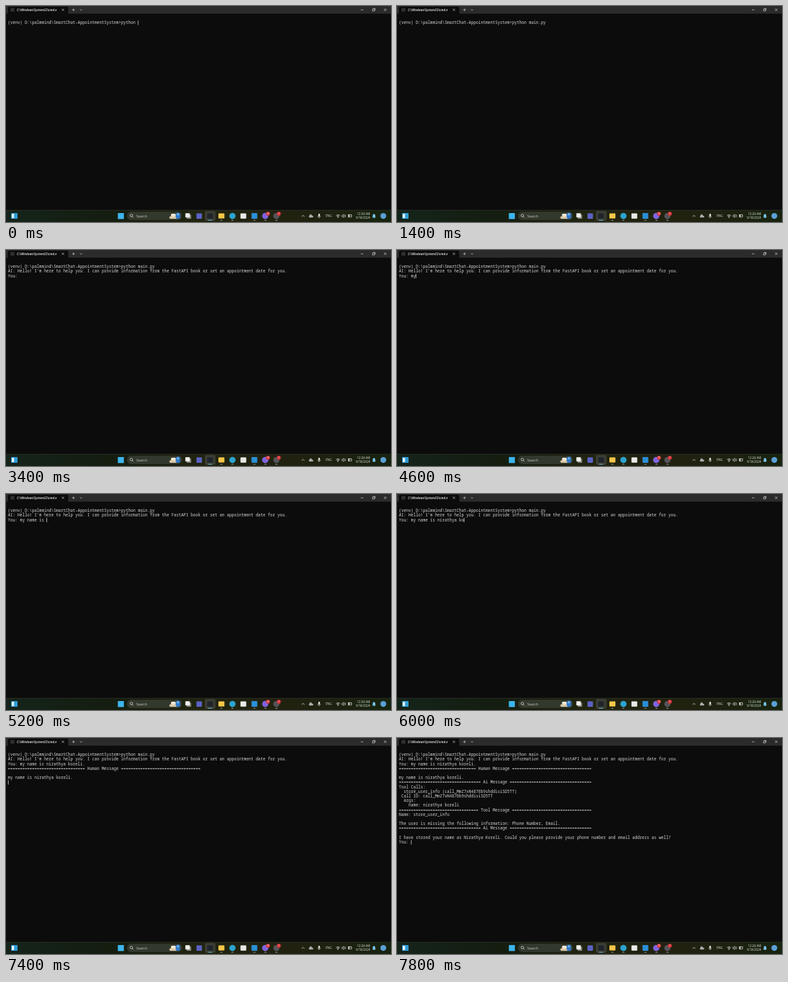
An HTML page with a canvas that plays this animation: 600 px wide and 338 px high, repeating every 8 s.

```html
<!DOCTYPE html>
<html lang="en">
<head>
<meta charset="utf-8">
<title>Terminal chat session</title>
<style>
html, body { margin: 0; width: 100%; height: 100%; overflow: hidden; background: #0c0c0c; }
canvas { display: block; width: 100vw; height: 100vh; }
</style>
</head>
<body>
<canvas id="stage"></canvas>
<script>
const W = 600, H = 338, LOOP = 8000, STEP = 200;
const COL = 3.75, ROW = 7.21, LEFT = 3, BASE = 28.1;
const MONO = '"Noto Sans Mono", monospace';
const UI = '"Open Sans", sans-serif';

const canvas = document.getElementById('stage');
const ctx = canvas.getContext('2d');
const dpr = window.devicePixelRatio || 1;
canvas.width = W * dpr;
canvas.height = H * dpr;

// Laid out large and scaled down, so glyph advances stay fractional.
function text(str, x, y, size, family, color, style = '', align = 'left') {
  const k = 8;
  ctx.save();
  ctx.translate(x, y);
  ctx.scale(1 / k, 1 / k);
  ctx.font = `${style} ${size * k}px ${family}`;
  ctx.textAlign = align;
  ctx.fillStyle = color;
  ctx.fillText(str, 0, 0);
  ctx.restore();
}

function rect(x, y, w, h, color, r = 0) {
  ctx.fillStyle = color;
  ctx.beginPath();
  ctx.roundRect(x, y, w, h, r);
  ctx.fill();
}

function disc(x, y, r, color) {
  ctx.fillStyle = color;
  ctx.beginPath();
  ctx.arc(x, y, r, 0, 7);
  ctx.fill();
}

function line(color, width, ...pts) {
  ctx.strokeStyle = color;
  ctx.lineWidth = width;
  ctx.beginPath();
  for (let i = 0; i < pts.length; i += 2) ctx.lineTo(pts[i], pts[i + 1]);
  ctx.stroke();
}

function arc(x, y, r, from, to, color, width) {
  ctx.strokeStyle = color;
  ctx.lineWidth = width;
  ctx.beginPath();
  ctx.arc(x, y, r, from, to);
  ctx.stroke();
}

function header(name) {
  const title = ` ${name} Message `;
  const left = Math.floor((80 - title.length) / 2);
  return '='.repeat(left) + title + '='.repeat(80 - title.length - left);
}

const PROMPT = '(venv) D:\\palmmind\\SmartChat-AppointmentSystem>python ';
const COMMAND = 'main.py';
const GREETING = "AI: Hello! I'm here to help you. I can provide information from the FastAPI book or set an appointment date for you.";
const INTRO = 'my name is nirathya koreli.';
const CALL = 'call_MmZ7xN4876b9shddisiSD5TT';
const HUMAN = [header('Human'), '', INTRO];
const TOOL = [
  header('Ai'),
  'Tool Calls:',
  `  store_user_info (${CALL})`,
  ` Call ID: ${CALL}`,
  '  Args:',
  '    name: nirathya koreli',
  header('Tool'),
  'Name: store_user_info',
  '',
  'The user is missing the following information: Phone Number, Email.'
];
const REPLY = [
  header('Ai'),
  '',
  'I have stored your name as Nirathya Koreli. Could you please provide your phone number and email address as well?'
];

const typed = (str, n) => str.slice(0, Math.max(0, Math.round(n)));

// The last row returned is the one that holds the cursor.
function screenRows(t) {
  const rows = [PROMPT + typed(COMMAND, 7 * t / 1000)];
  if (t < 1200) return rows;
  if (t < 3200) return [...rows, ''];
  rows.push(GREETING, 'You: ' + typed(INTRO, 2 + (t - 4600) / 70));
  if (t < 6600) return rows;
  rows.push(...HUMAN);
  if (t >= 7600) rows.push(...TOOL);
  if (t >= 7800) rows.push(...REPLY, 'You: ');
  else rows.push('');
  return rows;
}

function cursorOn(t) {
  const typing = t < 1200 || (t >= 4600 && t < 6600);
  const phase = t < 3200 ? 0 : 300;
  return typing || (t - phase) % 530 < 265;
}

function terminal(t) {
  rect(0, 12, W, 308, '#0c0c0c');
  const rows = screenRows(t);
  rows.forEach((row, i) => text(row, LEFT, BASE + i * ROW, 6.25, MONO, '#d6d6d6'));
  if (cursorOn(t)) {
    const last = rows.length - 1;
    rect(LEFT + rows[last].length * COL, 22.8 + last * ROW, 0.85, 7, '#d0d0d0');
  }
}

function titleBar() {
  rect(0, 0, W, 12, '#2b2b2b');
  rect(3, 1, 94, 11, '#0c0c0c', [2.5, 2.5, 0, 0]);
  rect(7, 3.2, 6, 5.6, '#303030');
  text('C:\\Windows\\System32\\cmd.e', 17, 7.8, 4.7, UI, '#f2f2f2', 'italic 600');
  const c = '#d8d8d8';
  line(c, 0.7, 87, 4.3, 90.4, 7.7);
  line(c, 0.7, 90.4, 4.3, 87, 7.7);
  line(c, 0.7, 103.2, 6, 107.2, 6);
  line(c, 0.7, 105.2, 4, 105.2, 8);
  line(c, 0.7, 115.4, 5.3, 117, 6.8, 118.6, 5.3);
  line(c, 0.7, 553, 6, 557, 6);
  ctx.strokeStyle = c;
  ctx.lineWidth = 0.7;
  ctx.strokeRect(571.2, 4.8, 3, 3);
  line(c, 0.7, 572.3, 3.8, 575.2, 3.8, 575.2, 6.8);
  line(c, 0.7, 589.2, 4.1, 592.8, 7.7);
  line(c, 0.7, 592.8, 4.1, 589.2, 7.7);
}

function searchBox() {
  rect(188.5, 322, 86, 13, '#33382d', 6.5);
  arc(195.4, 327.9, 2, 0, 7, '#e0e0e0', 0.8);
  line('#e0e0e0', 0.8, 196.9, 329.4, 198.7, 331.2);
  text('Search', 203, 330.5, 5.4, UI, '#c9ccc5');
  // Small illustration at the end of the box
  rect(254.5, 329, 13, 4, '#d9c9a4', 2);
  rect(257, 325, 8, 4.5, '#eee6d4', 2);
  rect(264.5, 323.5, 7, 9.5, '#2f78c8', 3);
  disc(268, 326, 1.7, '#79b9ea');
}

function badge(x, label) {
  disc(x, 325, 3.1, '#d8363a');
  text(label, x, 326.4, 3.9, UI, '#fff', '', 'center');
}

function apps() {
  rect(8, 324, 10, 9, '#2d9bd4', 1);
  rect(9, 325.2, 3.6, 6.6, '#e6f4fb', 0.5);

  rect(174.3, 324, 9.4, 9.4, '#3db5ee');
  searchBox();

  rect(281.5, 326.5, 7, 6.5, '#85877f', 0.6);
  rect(279.5, 324.3, 7, 6.5, '#efefef', 0.6);

  rect(310, 320.8, 16.5, 15.2, '#3a3e34', 2);
  rect(296.8, 324.5, 8.6, 8.4, '#5c62c4', 1);
  rect(313.6, 324.4, 9, 8.2, '#20242a', 1);
  rect(331, 324.6, 9.4, 8, '#f5c64a', 1);
  disc(352.9, 328.6, 4.9, '#2ba3cf');
  rect(365.4, 324.4, 9, 8.4, '#e9e9e7', 1);
  rect(382.6, 324, 9, 9, '#2a8fd6', 1);
  disc(404, 328.6, 4.9, '#7f63df');
  disc(421.4, 328.7, 4.8, '#55545a');
  badge(408.2, '12');
  badge(425.2, '1');

  rect(314.5, 334.8, 7, 1, '#75c4e8', 0.5);
  for (const x of [335.6, 352.8, 387.2, 404.4, 421.5]) rect(x - 1.7, 334.8, 3.4, 1, '#a4a69f', 0.5);
}

function tray() {
  const c = '#e4e4e2';
  line(c, 0.8, 460.8, 329.7, 463, 327.5, 465.2, 329.7);

  rect(472, 328, 6.8, 3, '#a9aca8', 1.5);
  disc(474.8, 327.9, 2, '#a9aca8');

  rect(486.8, 325, 2.4, 4.4, c, 1.2);
  arc(488, 328.4, 2.2, 0, Math.PI, c, 0.6);
  line(c, 0.6, 488, 330.6, 488, 332);

  text('ENG', 498.2, 330.3, 4.6, UI, c);

  for (const r of [1.7, 3, 4.3]) arc(517.4, 331, r, -Math.PI * 0.75, -Math.PI * 0.25, c, 0.7);
  disc(517.4, 330.8, 0.8, c);

  line(c, 0.7, 523.5, 327.4, 524.6, 327.4, 526.2, 325.9, 526.2, 331.1, 524.6, 329.6, 523.5, 329.6, 523.5, 327.4);
  for (const r of [1.6, 3]) arc(526.4, 328.5, r, -0.9, 0.9, c, 0.6);

  ctx.strokeStyle = c;
  ctx.lineWidth = 0.7;
  ctx.strokeRect(533.4, 326.6, 4.8, 3.6);
  rect(533.9, 327.1, 1.7, 2.6, c);
  rect(538.6, 327.7, 0.7, 1.4, c);

  text('12:26 AM', 567.5, 326.9, 4.7, UI, c, '', 'right');
  text('9/18/2024', 567.5, 333.3, 4.7, UI, c, '', 'right');

  const bell = '#7cc8ee';
  rect(571.6, 325.5, 3.8, 5, bell, [1.9, 1.9, 0, 0]);
  rect(570.8, 330, 5.4, 0.9, bell);
  disc(573.5, 331.3, 0.8, bell);

  disc(588, 328.6, 4.6, '#5a9fd6');
}

function taskbar() {
  const g = ctx.createLinearGradient(0, 0, W, 0);
  ['#15241b', '#141d10', '#20240f', '#212110', '#17230f'].forEach((c, i) => g.addColorStop(i / 4, c));
  rect(0, 319.5, W, 18.5, g);
  rect(0, 319, W, 0.7, '#2d302a');
  apps();
  tray();
}

function frame() {
  const now = performance.now() % LOOP;
  const t = Math.floor(now / STEP) * STEP;
  ctx.setTransform(dpr, 0, 0, dpr, 0, 0);
  titleBar();
  terminal(t);
  taskbar();
  requestAnimationFrame(frame);
}
frame();
</script>
</body>
</html>
```
